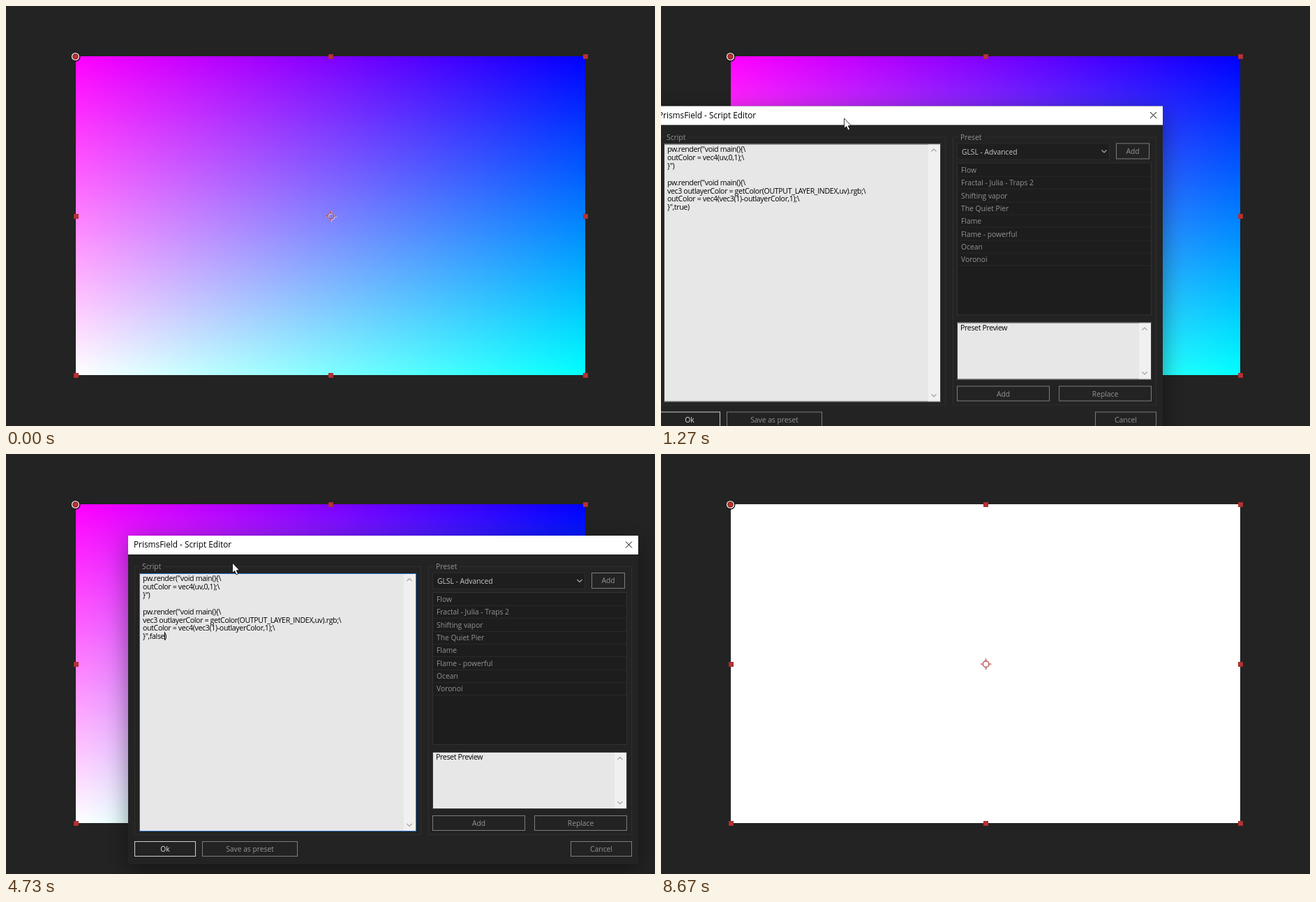
Animation, 930 px wide and 602 px high, one loop 9.14 s. Source, as an HTML page with a canvas:

```html
<!DOCTYPE html>
<html lang="en">
<head>
<meta charset="utf-8">
<title>Script editor</title>
<style>
html, body { margin: 0; width: 100%; height: 100%; overflow: hidden; background: #232323; }
canvas { display: block; }
</style>
</head>
<body>
<canvas id="stage" width="930" height="602"></canvas>
<script>
const ctx = document.getElementById('stage').getContext('2d');
const LOOP = 9140, FPS = 15;
const UI = '10.3px "Open Sans", sans-serif';
const CODE = '10.6px "Open Sans", sans-serif';
const TITLE = '11.8px "Open Sans", sans-serif';
const PANEL = '#232323', PAPER = '#e7e7e7', LABEL = '#949494', HANDLE = '#b83232';

const PRESETS = ['Flow', 'Fractal - Julia - Traps 2', 'Shifting vapor', 'The Quiet Pier',
  'Flame', 'Flame - powerful', 'Ocean', 'Voronoi'];
const SCRIPT = ['pw.render("void main(){\\', 'outColor = vec4(uv,0,1);\\', '}")', '',
  'pw.render("void main(){\\',
  'vec3 outlayerColor = getColor(OUTPUT_LAYER_INDEX,uv).rgb;\\',
  'outColor = vec4(vec3(1)-outlayerColor,1);\\'];

// Motion paths: [time, x, y]
const HOME = { x: 175, y: 117 };
const WINDOW_PATH = [[667, -119, 141], [1130, -119, 141], [1267, -12, 143.5], [1467, 175, 117]];
const POINTER_PATH = [[800, -5, 330], [1070, 155, 159], [1130, 155, 159], [1267, 262, 161],
  [1467, 449, 135], [1533, 440, 160], [1867, 260, 240], [2067, 226, 256], [2200, 226, 256],
  [2467, 323, 156], [4720, 323, 156], [4733, 324, 156], [4800, 324, 156], [4933, 318, 190],
  [5200, 250, 450], [5467, 220, 575], [8467, 220, 575], [8600, 182, 597]];
const DELETES = [3000, 3200, 3333, 3533];
const INSERTS = [3933, 4000, 4200, 4333, 4400];

const passed = (times, t) => times.filter(time => t + 1 >= time).length;
const between = (t, from, to) => t + 1 >= from && t + 1 < to;

function along(path, t) {
  const i = path.findIndex(p => p[0] > t + 1);
  const [t0, x0, y0] = path[i < 0 ? path.length - 1 : Math.max(i - 1, 0)];
  if (i < 1) return { x: x0, y: y0 };
  const [t1, x1, y1] = path[i];
  const k = Math.max(0, (t - t0) / (t1 - t0));
  return { x: Math.round(x0 + (x1 - x0) * k), y: Math.round((y0 + (y1 - y0) * k) * 2) / 2 };
}

function fill(x, y, w, h, color) {
  ctx.fillStyle = color;
  ctx.fillRect(x, y, w, h);
}

function box(x0, y0, x1, y1, border, background) {
  if (background) fill(x0, y0, x1 - x0, y1 - y0, background);
  ctx.strokeStyle = border;
  ctx.lineWidth = 1;
  ctx.strokeRect(x0 + .5, y0 + .5, x1 - x0 - 1, y1 - y0 - 1);
}

function text(string, x, y, color, font = UI, align = 'left') {
  ctx.font = font;
  ctx.letterSpacing = font === CODE ? '-0.35px' : '0px';
  ctx.textAlign = align;
  ctx.fillStyle = color;
  ctx.fillText(string, x, y + 4);
}

function line(points, color, width = 1) {
  ctx.beginPath();
  points.forEach(([x, y]) => ctx.lineTo(x, y));
  ctx.strokeStyle = color;
  ctx.lineWidth = width;
  ctx.stroke();
}

function ring(x, y, r, color, width) {
  ctx.beginPath();
  ctx.arc(x, y, r, 0, 7);
  ctx.strokeStyle = color;
  ctx.lineWidth = width;
  ctx.stroke();
}

function chevron(x, y, dir, color) {
  line([[x - 3.5, y - 2 * dir], [x, y + 1.5 * dir], [x + 3.5, y - 2 * dir]], color, 1.1);
}

function button(label, x0, y0, x1, y1, color = LABEL, border = '#7c7c7c') {
  box(x0, y0, x1, y1, border, PANEL);
  text(label, (x0 + x1) / 2, Math.floor((y0 + y1) / 2), color, UI, 'center');
}

function group(label, x0, x1, gap) {
  box(x0, 161, x1, 546, '#2f2f2f');
  fill(x0 + 8, 160, gap, 3, PANEL);
  text(label, x0 + 11, 161, LABEL);
}

function textArea(x0, y0, x1, y1, border) {
  box(x0, y0, x1, y1, border, PAPER);
  fill(x1 - 18, y0 + 1, 17, y1 - y0 - 2, '#f0f0f0');
  chevron(x1 - 10, y0 + 9, -1, '#a0a0a0');
  chevron(x1 - 10, y1 - 9, 1, '#a0a0a0');
}

function drawComposition(t) {
  const [x, y, w, h] = [100, 72, 730, 457];
  fill(0, 0, 930, 602, PANEL);
  if (between(t, 6467, LOOP)) fill(x, y, w, h, '#fff');
  else {
    const red = ctx.createLinearGradient(x, 0, x + w, 0);
    red.addColorStop(0, '#f00');
    red.addColorStop(1, '#000');
    const green = ctx.createLinearGradient(0, y, 0, y + h);
    green.addColorStop(0, '#000');
    green.addColorStop(1, '#0f0');
    fill(x, y, w, h, '#00f');
    ctx.globalCompositeOperation = 'lighter';
    fill(x, y, w, h, red);
    fill(x, y, w, h, green);
    ctx.globalCompositeOperation = 'source-over';
  }
  for (const hx of [100, 465, 830])
    for (const hy of [72, 301, 529]) {
      if (hx === 465 && hy === 301) drawAnchor(465.5, 301);
      else if (hx === 100 && hy === 72) drawSelectedCorner(99.5, 72.5);
      else box(hx - 3, hy - 3, hx + 4, hy + 4, '#a62d2d', HANDLE);
    }
}

function drawSelectedCorner(x, y) {
  ring(x + .5, y + .5, 5.6, '#000', 1.6);
  ctx.beginPath();
  ctx.arc(x, y, 4.5, 0, 7);
  ctx.fillStyle = HANDLE;
  ctx.fill();
  ring(x, y, 4.9, '#fff', 1.4);
  ring(x, y, 3.9, '#6b1c1c', .8);
}

function drawAnchor(x, y) {
  const cross = (offset, color) => {
    const cx = x + offset, cy = y + offset;
    ring(cx, cy, 4.4, color, 1.3);
    for (const [ux, uy] of [[1, 0], [-1, 0], [0, 1], [0, -1]])
      line([[cx + ux * 5, cy + uy * 5], [cx + ux * 8, cy + uy * 8]], color);
  };
  cross(.9, '#d8d8d8');
  cross(0, '#c04848');
}

function drawWindow(t) {
  const { x, y } = along(WINDOW_PATH, t);
  const blank = between(t, 667, 733);
  ctx.save();
  ctx.translate(x - HOME.x, y - HOME.y);

  ctx.save();
  ctx.shadowColor = blank ? 'rgba(0,0,0,.4)' : 'rgba(0,0,0,.42)';
  ctx.shadowBlur = blank ? 8 : 32;
  ctx.shadowOffsetY = blank ? 2 : 8;
  fill(175, 117, 731, 471, blank ? '#fff' : PANEL);
  ctx.restore();

  fill(175, 117, 731, 27, '#fff');
  const ink = blank ? '#999' : '#000';
  text('PrismsField - Script Editor', 183, 130, ink, TITLE);
  line([[888, 125.5], [897, 134.5]], ink);
  line([[897, 125.5], [888, 134.5]], ink);
  if (!blank) drawControls(t);
  ctx.restore();
}

function drawControls(t) {
  const focused = between(t, 2067, 5733);
  group('Script', 184, 595, 35);
  textArea(191, 171, 588, 541, focused ? '#2a6fc9' : '#3c3c3c');
  SCRIPT.forEach((row, i) => text(row, 196, Math.round(178 + i * 11.9), '#000', CODE));
  const start = '}",' + 'true'.slice(0, 4 - passed(DELETES, t)) + 'false'.slice(0, passed(INSERTS, t));
  text(start + ')', 196, 261, '#000', CODE);
  const caretOn = between(t, 2333, 2867) || between(t, 3000, 4933) || between(t, 5467, 5733);
  if (caretOn) fill(Math.round(196 + ctx.measureText(start).width), 255, 1, 12, '#000');

  group('Preset', 605, 897, 38);
  box(611, 170, 830, 194, '#2c2c2c', '#1e1e1e');
  text('GLSL - Advanced', 618, 182, '#c8c8c8');
  chevron(822, 182, 1, '#b0b0b0');
  button('Add', 839, 170, 887, 193);

  box(611, 198, 890, 417, '#323232', '#1d1d1d');
  PRESETS.forEach((name, i) => {
    const mid = 208 + i * 18.3;
    text(name, 617, Math.round(mid), LABEL);
    fill(612, Math.round(mid + 9), 277, 1, '#292929');
  });

  textArea(611, 427, 890, 509, '#3c3c3c');
  text('Preset Preview', 616, 434, '#000', CODE);
  button('Add', 611, 518, 744, 540);
  button('Replace', 757, 518, 890, 540);
  const hot = between(t, 5467, 5867);
  button('Ok', 184, 555, 272, 577, hot ? '#fff' : '#e0e0e0', hot ? '#fff' : '#d0d0d0');
  button('Save as preset', 281, 555, 418, 577);
  button('Cancel', 809, 555, 897, 577);
}

function drawPointer(t) {
  const { x, y } = along(POINTER_PATH, t);
  const overScript = between(t, 1533, 5467) && x > 191 && x < 570 && y > 171 && y < 541;
  ctx.save();
  ctx.translate(x, y);
  if (overScript) {
    line([[.5, -8], [.5, 8]], '#222');
    line([[-3, -7.5], [4, -7.5]], '#222');
    line([[-3, 8.5], [4, 8.5]], '#222');
  } else {
    const arrow = new Path2D('M.5 0V14.5L3.7 11.6 6 17 8.6 15.9 6.3 10.7H10.7Z');
    ctx.fillStyle = '#fff';
    ctx.fill(arrow);
    ctx.strokeStyle = '#000';
    ctx.lineWidth = .8;
    ctx.stroke(arrow);
  }
  ctx.restore();
}

function draw(now) {
  // Hold each picture for a fifteenth of a second.
  const t = Math.floor((now % LOOP + 4) * FPS / 1000) * 1000 / FPS;
  drawComposition(t);
  if (between(t, 667, 5867)) drawWindow(t);
  if (between(t, 800, 8667)) drawPointer(t);
}

const began = performance.now();
function tick() {
  draw(performance.now() - began);
  requestAnimationFrame(tick);
}
tick();
</script>
</body>
</html>
```
